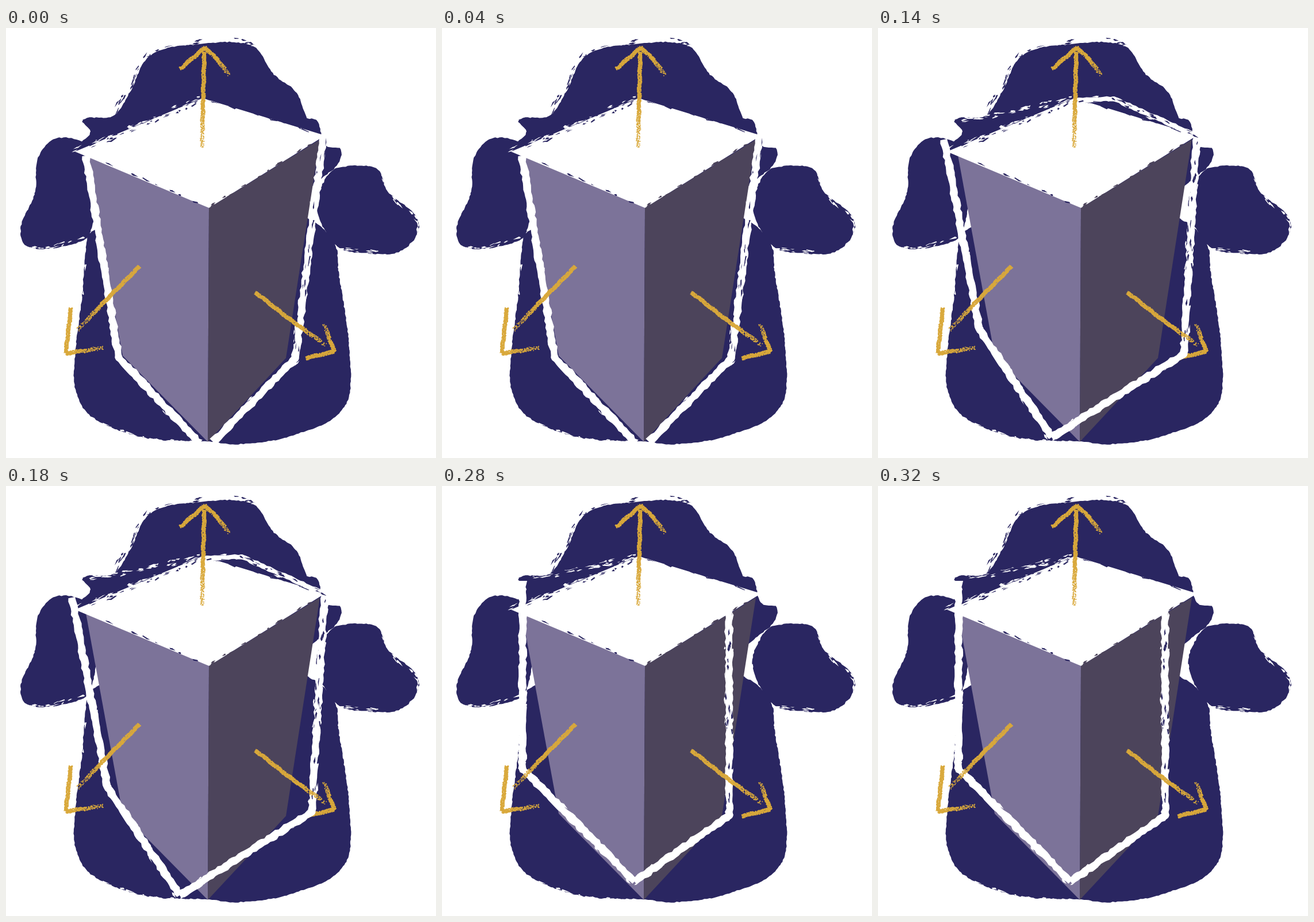
An HTML page with a canvas for the animation above (0.35 s loop, 748 by 748 pixels).

```html
<!DOCTYPE html>
<html>
<head>
<meta charset="utf-8">
<style>
html, body { margin: 0; overflow: hidden; background: #fff; }
canvas { display: block; }
</style>
</head>
<body>
<canvas id="stage" width="748" height="748"></canvas>
<script>
const ctx = document.getElementById('stage').getContext('2d');
const NAVY = '#2a2661', GOLD = '#d9a93c', WHITE = '#fff', LILAC = '#7c7399', SLATE = '#4c445b';
const STEP_MS = 70;

let seed = 1;
const random = () => {
  seed = (seed * 16807) % 2147483647;
  return seed / 2147483647;
};
const jitter = size => (random() - 0.5) * 2 * size;
const points = text => text.split(' ').map(pair => pair.split(',').map(Number));

function fillPoints(list, color) {
  ctx.fillStyle = color;
  ctx.beginPath();
  list.forEach(([x, y]) => ctx.lineTo(x, y));
  ctx.fill();
}

// Evenly spaced points along a polyline, each with its unit direction.
function sample(list, gap) {
  return list.slice(1).flatMap(([x2, y2], i) => {
    const [x, y] = list[i], dx = x2 - x, dy = y2 - y;
    const length = Math.hypot(dx, dy), count = Math.ceil(length / gap);
    return Array.from({ length: count + 1 }, (_, k) => ({
      x: x + dx * k / count, y: y + dy * k / count, ux: dx / length, uy: dy / length
    }));
  });
}
// A point at distance `along` and `across` from a sampled one.
const offset = (p, along, across) =>
  [p.x + p.ux * along - p.uy * across, p.y + p.uy * along + p.ux * across];

// Closed smooth shape through a few points, with a slightly torn edge.
function blob(text) {
  const list = points(text), n = list.length, edge = [];
  const tangent = i => {
    const a = list[(i + n - 1) % n], b = list[(i + 1) % n];
    const dx = b[0] - a[0], dy = b[1] - a[1], length = Math.hypot(dx, dy);
    return [dx / length, dy / length];
  };
  list.forEach((p, i) => {
    const j = (i + 1) % n, q = list[j], from = tangent(i), to = tangent(j);
    const length = Math.hypot(q[0] - p[0], q[1] - p[1]);
    for (let t = 0; t < 1; t += 4 / length) {
      const s = 1 - t;
      edge.push([0, 1].map(k =>
        s * s * s * p[k] + 3 * s * s * t * (p[k] + from[k] * length / 3) +
        3 * s * t * t * (q[k] - to[k] * length / 3) + t * t * t * q[k] + jitter(0.8)));
    }
  });
  fillPoints(edge, NAVY);
}

// Thin slivers scattered along a line.
function flecks(list, color, density, spread) {
  const path = sample(list, 2);
  for (let i = 0; i < path.length * density; i++) {
    const p = path[Math.floor(random() * path.length)];
    const across = jitter(spread), half = 2 + random() * 6, thick = 0.5 + random() * 1.5;
    fillPoints([
      offset(p, -half, across),
      offset(p, jitter(half), across + thick),
      offset(p, half, across + jitter(1)),
      offset(p, jitter(half), across - thick)
    ], color);
  }
}

// Dry brush line with ragged sides and square corners.
function brush(list, width) {
  for (let i = 1; i < list.length; i++) {
    const path = sample([list[i - 1], list[i]], 6);
    const side = sign => path.map(p => offset(p, 0, sign * (width / 2 + jitter(width / 8))));
    fillPoints([...side(1), ...side(-1).reverse()], WHITE);
  }
  list.slice(1, -1).forEach(([x, y]) => {
    ctx.beginPath();
    ctx.arc(x, y, width / 2, 0, 7);
    ctx.fill();
  });
  flecks(list, WHITE, 0.1, width / 2 + 2);
}

// Grainy chalk line that breaks up over its last part.
function chalk(text, fade = 0) {
  const path = sample(points(text), 0.5);
  ctx.fillStyle = GOLD;
  path.forEach((p, i) => {
    const left = 1 - i / path.length;
    const density = left < fade ? 0.1 + 0.6 * left / fade : 1;
    for (let k = 0; k < 4; k++) {
      if (random() > density) continue;
      const [x, y] = offset(p, 0, jitter(3.3) + Math.sin(i / 9) * 0.5);
      ctx.fillRect(x - 0.8, y - 0.8, 1.6, 1.6);
    }
  });
}

function silhouette() {
  blob('186,153 215,112 252,47 340,28 428,31 466,81 506,113 524,156 541,160 556,205 583,212 568,247 300,420 128,208 147,181 134,160');
  blob('556,262 575,244 632,240 650,250 664,284 718,338 690,386 630,392 574,378 540,310');
  blob('147,355 100,380 36,379 26,345 50,288 56,225 92,191 150,215');
  blob('148,355 139,385 132,470 121,560 121,630 150,677 242,713 350,719 405,724 502,708 588,660 597,560 578,420 573,378 540,340 360,260');

  flecks(points('190,146 246,45 340,24'), NAVY, 0.3, 5);
  flecks(points('396,19 438,31'), NAVY, 0.3, 3);
  flecks(points('36,381 75,383 132,365'), WHITE, 0.3, 3);
  flecks(points('650,249 666,288 718,335 719,360'), WHITE, 0.3, 4);
  flecks(points('580,383 650,391'), WHITE, 0.3, 3);
  flecks(points('137,395 126,520'), WHITE, 0.25, 5);
  flecks(points('170,690 242,714 320,719'), WHITE, 0.2, 2);
}

function box() {
  const west = [120, 215], north = [342, 122], east = [555, 187], middle = [353, 313], foot = [351, 720];
  fillPoints([[138, 216], middle, foot, [203, 570]], LILAC);
  fillPoints([middle, [546, 194], [487, 574], foot], SLATE);
  fillPoints([west, north, east, middle], WHITE);
  flecks([west, north], WHITE, 0.35, 6);
  flecks(points('150,206 335,129'), NAVY, 0.25, 4);
  flecks([north, east], NAVY, 0.12, 3);
  flecks([middle, [530, 204]], SLATE, 0.25, 3);
  flecks([[165, 231], middle], NAVY, 0.06, 2);
}

// Corners from the top left around the tip to the top right; `cap` is a loose top edge.
const poses = [
  { outline: '139,222 196,573 336,722 360,720 503,575 552,190' },
  { outline: '110,226 193,572 318,714 525,584 568,243', cap: '515,215 574,245' },
  { outline: '115,194 177,525 302,712 532,567 554,190', cap: '345,126 410,123 553,187' },
  { outline: '131,208 187,573 408,716 481,570 509,122', cap: '342,122 510,124' },
  { outline: '140,165 140,492 335,688 500,573 499,212' }
];

function draw(index) {
  seed = 4127;
  ctx.fillStyle = WHITE;
  ctx.fillRect(0, 0, 748, 748);
  silhouette();
  box();
  chalk('571,563 522,574');

  const { outline, cap } = poses[index], corners = points(outline);
  const half = Math.ceil(corners.length / 2);
  brush(corners.slice(0, half), 13);
  brush(corners.slice(-half), 13);
  flecks(corners.slice(-2), NAVY, 0.12, 6);
  if (cap) {
    brush(points(cap), 8);
    flecks(points(cap), NAVY, 0.15, 4);
  }
  if (index && index % 2 === 0) flecks(points('142,160 200,153 335,123'), WHITE, 0.35, 4);

  seed = 2718;
  chalk('345,42 343,120 341,208', 0.4);
  chalk('303,71 346,34');
  chalk('346,34 368,55 388,82', 0.5);
  chalk('232,415 180,467 124,526', 0.4);
  chalk('113,487 104,565');
  chalk('104,566 172,556', 0.7);
  chalk('434,460 490,504 558,553', 0.3);
  chalk('571,563 553,515', 0.6);
}

let shown = -1;
function tick() {
  const index = Math.floor(performance.now() / STEP_MS) % poses.length;
  if (index !== shown) draw(shown = index);
  requestAnimationFrame(tick);
}
tick();
</script>
</body>
</html>
```
